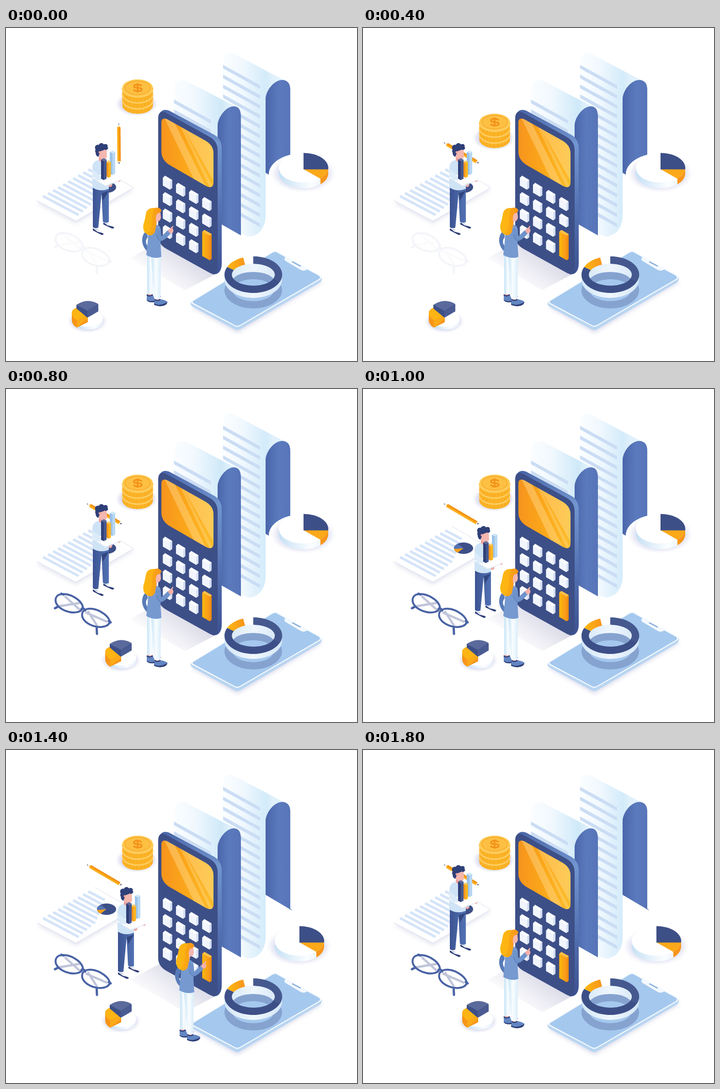
Write an HTML page that moves like this. It is 768 px wide and 729 px high and loops after 2000 ms.

```html
<!DOCTYPE html>
<html lang="en">
<head>
<meta charset="utf-8">
<title>Isometric accounting</title>
<style>
html, body { margin: 0; width: 100%; height: 100%; overflow: hidden; background: #fff; }
svg { display: block; width: 100vw; height: 100vh; }
.step { animation: 2s step-end infinite; }
#pencilUp { animation-name: hide; }
#pencilFlat { animation-name: show; }
#coins { animation-name: coins; }
#glasses { animation-name: glasses; }
#smallPie { animation-name: smallPie; }
#man { animation-name: man; }
#bigPie { animation-name: bigPie; }
#woman { animation-name: woman; }
@keyframes hide { 0% { opacity: 1 } 10%, 100% { opacity: 0 } }
@keyframes show { 0% { opacity: 0 } 10%, 100% { opacity: 1 } }
@keyframes coins { 0% { transform: none } 20%, 100% { transform: translate(0, 75px) } }
@keyframes glasses { 0% { opacity: .06 } 30%, 100% { opacity: 1 } }
@keyframes smallPie { 0% { transform: none } 40%, 100% { transform: translate(73px, -48px) } }
@keyframes man { 0%, 80%, 100% { transform: none } 50% { transform: translate(55px, 48px) } }
@keyframes bigPie { 0% { transform: none } 60%, 100% { transform: translate(-9px, 112px) } }
@keyframes woman { 0%, 90%, 100% { transform: none } 70% { transform: translate(72px, 29px) } }
</style>
</head>
<body>
<svg viewBox="0 0 768 729" preserveAspectRatio="none">
  <defs>
    <linearGradient id="paperBack" gradientUnits="userSpaceOnUse" x1="474" y1="0" x2="585" y2="0">
      <stop stop-color="#fcfeff"/><stop offset=".4" stop-color="#f0f8fe"/><stop offset=".85" stop-color="#d3ebfa"/><stop offset="1" stop-color="#e0f1fb"/>
    </linearGradient>
    <linearGradient id="paperFront" gradientUnits="userSpaceOnUse" x1="364" y1="0" x2="490" y2="0">
      <stop stop-color="#fcfeff"/><stop offset=".4" stop-color="#f0f8fe"/><stop offset=".85" stop-color="#cfe9f8"/><stop offset="1" stop-color="#e0f1fb"/>
    </linearGradient>
    <linearGradient id="under"><stop stop-color="#4a66ab"/><stop offset=".5" stop-color="#5b7abd"/><stop offset="1" stop-color="#5674b7"/></linearGradient>
    <linearGradient id="caseSide" x2="0" y2="1"><stop stop-color="#4a66a8"/><stop offset=".2" stop-color="#7296d0"/><stop offset=".6" stop-color="#5472b2"/><stop offset="1" stop-color="#3c5191"/></linearGradient>
    <linearGradient id="screen"><stop stop-color="#f7941d"/><stop offset=".5" stop-color="#fba81a"/><stop offset="1" stop-color="#fdbd2c"/></linearGradient>
    <linearGradient id="amber"><stop stop-color="#fdb80f"/><stop offset="1" stop-color="#f7951b"/></linearGradient>
    <linearGradient id="ice"><stop stop-color="#c6e1f5"/><stop offset=".65" stop-color="#fbfdff"/><stop offset="1" stop-color="#e6f1fb"/></linearGradient>
    <linearGradient id="wall"><stop stop-color="#d3e6f7"/><stop offset=".5" stop-color="#f0f7fd"/><stop offset="1" stop-color="#d3e6f7"/></linearGradient>
    <linearGradient id="jeans"><stop stop-color="#3c5392"/><stop offset="1" stop-color="#5272b4"/></linearGradient>
    <linearGradient id="pants"><stop stop-color="#c4e3f6"/><stop offset=".5" stop-color="#fafdff"/><stop offset="1" stop-color="#d8edf9"/></linearGradient>
    <linearGradient id="floor" gradientUnits="userSpaceOnUse" x1="385" y1="490" x2="335" y2="560">
      <stop stop-color="#dcdce9"/><stop offset="1" stop-color="#fff"/>
    </linearGradient>
    <radialGradient id="soft"><stop offset=".6" stop-color="#c9cbe8"/><stop offset=".8" stop-color="#d9dbf0" stop-opacity=".6"/><stop offset="1" stop-color="#fff" stop-opacity="0"/></radialGradient>
    <filter id="blur"><feGaussianBlur stdDeviation="5"/></filter>
    <clipPath id="backClip"><path d="M474 60H568V410C568 440 550 457 528 456L474 456Z"/></clipPath>
    <clipPath id="screenClip"><path id="screenShape" d="M340 207C340 198 346 196 355 201L437 247Q454 257 454 275V338C454 348 448 351 438 346L358 300Q340 289 340 270Z"/></clipPath>
    <g id="pencil">
      <path d="M0-44L-1.5-40H1.5Z" fill="#2c3768"/>
      <path d="M-1.5-41H1.5L3.6-35V-33H-3.6V-35Z" fill="#fff1de"/>
      <path d="M-3.6-35L0-37L3.6-35V40H-3.6Z" fill="#fbac17"/>
      <path d="M.8-36L3.6-35V40H.8Z" fill="#f18a10"/>
      <path d="M-3.6 39H3.6L2.6 43H-2.6Z" fill="#fff1dc"/>
      <circle cy="43" r="1.4" fill="#2c3768"/>
    </g>
  </defs>

  <!-- long receipt -->
  <path d="M474 300V78C474 58 485 50 498 56L608 114C582 116 568 140 568 160V410C568 440 550 458 528 456L514 450Z" fill="url(#paperBack)"/>
  <g id="backLines" clip-path="url(#backClip)" fill="#cbddf4"></g>
  <path d="M568 317V155C569 136 588 111 608 114Q622 117 622 135V347L627 352Z" fill="url(#under)"/>
  <path d="M366 260V146C363 122 376 110 393 115L502 172C480 174 463 195 463 215V260Z" fill="url(#paperFront)"/>
  <g id="frontLines" fill="#cbddf4"></g>
  <path d="M463 425V213C464 193 485 168 502 172Q514 174 514 194V454Z" fill="url(#under)"/>

  <!-- sheet -->
  <path d="M68 383L153 428L279 354L195 312Z" fill="#c9cbe0" opacity=".5" filter="url(#blur)"/>
  <path d="M68 377L153 422L279 349L195 301Z" fill="#fff"/>
  <path d="M68 377L153 422L279 349V351L153 425L68 379Z" fill="#e6e8f3"/>
  <path d="M195 301L279 349" stroke="#ececf5" stroke-width="1.5"/>
  <g id="sheetLines" stroke="#d5e4f8" stroke-width="5.5"></g>
  <ellipse cx="220" cy="348.5" rx="21" ry="12.5" fill="#3d4f87"/>
  <path d="M220 348.5L199 350Q201 355 207 358.3Z" fill="#f7a01b"/>
  <path d="M220 348.5L199 350Q198 343 207 339Z" fill="#5674b4"/>

  <!-- calculator -->
  <path d="M271 504L345 463L458 539L392 574Z" fill="url(#floor)"/>
  <path d="M337 186C342 178 351 178 359 182L456 234Q472 243 472 264V516C472 532 464 541 452 539L345 440Z" fill="url(#caseSide)"/>
  <path d="M333 199C333 184 340 180 351 186L445 238Q463 248 463 267V521C463 538 456 542 444 535L352 484Q333 474 333 455Z" fill="#3d4f87"/>
  <use href="#screenShape" fill="url(#screen)"/>
  <g clip-path="url(#screenClip)" fill="#ffe3a0">
    <path d="M383 210H460V345Z" opacity=".38"/>
    <path d="M345 194L369 208L440 352L414 337Z" opacity=".38"/>
    <path d="M378 208L385 212L455 352H447Z" opacity=".3"/>
  </g>
  <g id="keys"></g>
  <path d="M429.5 446L434 442L450 451V505L446 508.5L429.5 499Z" fill="#ee8c10"/>
  <path d="M429.5 446L434 442L450 451L446 455Z" fill="#fdc04a"/>
  <path d="M429.5 446L446 455V508.5L429.5 499Z" fill="url(#amber)"/>

  <!-- phone -->
  <path d="M406 610L506 667L692 556L590 500Z" fill="#b9bcdc" opacity=".55" filter="url(#blur)"/>
  <path d="M404 600V605Q405 608 410 611L501 660Q507 663 513 659L687 557Q692 553 691 546Z" fill="#b9d5f1"/>
  <path d="M408 596L582 490Q588 486 594 489L687 541Q694 546 687 551L513 652Q507 656 501 653L408 604Q401 600 408 596Z" fill="#f3f9fe"/>
  <path d="M410 597.500L583 492Q588 489 592 491L611 501.500C607 508 610 509 615 512L642 528C647 531 652 533 659 528.500L684 542Q690 546 684 550L512 650Q507 653 502 651L410 602Q407 600 410 597.500Z" fill="#a5c8ee"/>
  <path d="M627 512L644 521" stroke="#7da5d8" stroke-width="2.5" stroke-linecap="round"/>
  <path d="M478 574a63 40 0 1 0 126 0a63 40 0 1 0-126 0M496 574a45 24 0 1 1 90 0a45 24 0 1 1-90 0" fill="#86a3d0"/>
  <path d="M478 540V551A63 40 0 0 0 604 551V540A63 24 0 0 0 478 540M495 555a46 21 0 1 1 92 0a46 21 0 1 1-92 0" fill="url(#wall)" fill-rule="evenodd"/>
  <path d="M541 500A63 40 0 1 1 484 523L498.5 530A47 24 0 1 0 541 516Z" fill="#3d4f87"/>
  <path d="M541 500A63 40 0 0 1 599 556L585 549A47 24 0 0 0 541 516Z" fill="#46598f"/>
  <path d="M484 523A63 40 0 0 1 519 502.5L523 518A47 24 0 0 0 498.5 530Z" fill="url(#amber)"/>

  <g id="coins" class="step">
    <ellipse cx="286" cy="166" rx="49" ry="29" fill="url(#soft)" opacity=".9"/>
    <path d="M254.5 131V169A33.5 19 0 0 0 321.5 169V131Z" fill="#fbb426"/>
    <g id="coinEdges" fill="none"></g>
    <ellipse cx="288" cy="131" rx="33.5" ry="18.5" fill="#fdc94f"/>
    <ellipse cx="288" cy="131" rx="28" ry="15" fill="#fdc043" stroke="#f9a52a" stroke-width="1.5"/>
    <path d="M297 127C292 122 280 123 280 128C280 133 297 129 297 134.5C297 139.5 283 139.5 279 135M288 121V141" fill="none" stroke="#f4931a" stroke-width="3.6"/>
  </g>

  <use id="pencilUp" class="step" href="#pencil" transform="translate(247 252.5) rotate(-.5)"/>
  <g id="pencilFlat" class="step"><use href="#pencil" transform="translate(214.5 273) rotate(-59.6)"/></g>

  <g id="glasses" class="step" fill="none" stroke="#4a63a5" stroke-width="4.2" stroke-linecap="round">
    <path d="M114 476L163 468M180 488L198 516M130 455L160 482M176 490L220 509" stroke="#c0c5da" stroke-width="5"/>
    <path d="M120 449.500C139 446 164 461 168 476C168 490 147 492 131 486C115 480 106 469 109 458Q112 450 120 449.500Z"/>
    <path d="M178 481.500C197 478 222 493 227 508C227 521 205 524 189 518C173 512 164 501 167 490Q170 483 178 481.500Z"/>
    <path d="M165 482Q169 477 173 485M121 448L126 450M107 480L114 476.500M199 536L198.500 524M225 508L229 511" stroke-width="5"/>
  </g>

  <g id="smallPie" class="step">
    <ellipse cx="178" cy="642" rx="46" ry="27" fill="url(#soft)" opacity=".8"/>
    <path d="M155 650L211 636V643C211 656 190 665 155 656Z" fill="url(#ice)"/>
    <path d="M178 634L202 622C215 630 215 644 201 650Q182 658 155 650Z" fill="#fff"/>
    <path d="M144 622V642Q146 651 155 656L179 644V628Z" fill="#f7951b"/>
    <path d="M155 640L179 628V636L155 656Z" fill="#fbaa18"/>
    <path d="M155 612Q144 616 144 623Q144 633 155 640L179 628Z" fill="#fdb415"/>
    <path d="M154 606V614L178 634L202 620V605Z" fill="#3d4f87"/>
    <path d="M178 619L202 605V620L178 634Z" fill="#4a5b92"/>
    <path d="M154 606Q178 590 202 604L178 619Z" fill="#5a6a9c"/>
  </g>

  <g id="bigPie" class="step">
    <ellipse cx="650" cy="320" rx="75" ry="46" fill="#fff"/>
    <ellipse cx="650" cy="318" rx="75" ry="44" fill="url(#soft)" opacity=".8"/>
    <path d="M597 307V318A54 33 0 0 0 705 318V307Z" fill="url(#ice)"/>
    <path d="M705 308V320Q703 334 688 342V329Z" fill="#f7951b"/>
    <ellipse cx="651" cy="306" rx="54" ry="32.5" fill="#fff"/>
    <path d="M651 309L705 309Q703 321 688 330Z" fill="#fba81a"/>
    <path d="M651 309.5V273.5A54 33 0 0 1 705 309.5Z" fill="#3d4f87"/>
  </g>

  <g id="man" class="step">
    <path d="M190 439Q200 440 204 445L213 450Q215 453 209 453L190 443ZM213 426Q222 427 227 431L236 436Q238 439 232 439L213 430Z" fill="#2f3f78"/>
    <path d="M190 438L204 444L212 449L200 446ZM213 425L228 431L235 435L222 432Z" fill="#f3f6fd"/>
    <path d="M190 350H225V425Q217 428 212 424L209 362L202 437Q195 440 190 436Z" fill="url(#jeans)"/>
    <path d="M209 362L225 356L212 378Z" fill="#32467f"/>
    <path d="M203 282H216V298H203Z" fill="#eda49d"/>
    <path d="M203 289Q189 291 189 306V349Q205 360 225 352V293L217 289Q210 298 203 289Z" fill="#cfe3f6"/>
    <path d="M203 264H220L221 281Q219 289 211 287L203 283Z" fill="#f4b7b0"/>
    <path d="M196 266C192 260 198 254 203 256C205 251 212 251 214 255C219 252 224 256 222 260C226 264 220 269 216 266C211 269 207 268 206 272L202 282Q196 280 196 272Q194 270 196 266Z" fill="#2f3f78"/>
    <circle cx="205" cy="272" r="2.5" fill="#eda49d"/>
    <path d="M224 343L232 341Q234 346 229 348Q224 349 224 343M242 335L249 331Q253 335 247 337Z" fill="#f0aaa4"/>
    <path d="M187 327L218 345L260 329L232 314Z" fill="#fff"/>
    <path d="M187 327L218 345L260 329L218 348Z" fill="#dfe8f5"/>
    <path d="M189 309Q186 326 198 333L208 334V326L200 318Z" fill="#dcebf9"/>
    <g id="manBars"></g>
  </g>

  <g id="woman" class="step">
    <path d="M310 578H321V588H310ZM327 586H337V598H327Z" fill="#f0aaa4"/>
    <path d="M308 583Q313 588 321 583L325 593V598Q312 601 308 594ZM324 593Q331 599 337 594Q345 594 353 599Q354 604 345 607Q335 611 324 604Z" fill="#6386c2"/>
    <path d="M308 594Q313 600 325 597V600Q312 602 308 596ZM324 603Q335 610 353 600Q353 605 345 608Q334 611 324 606Z" fill="#2f3f78"/>
    <path d="M308 584Q313 589 321 584M325 594Q331 599 338 594M335 584L338 589" fill="none" stroke="#2f3f78" stroke-width="2.5"/>
    <path d="M309 492H325L321 582Q315 585 309 581Z" fill="url(#pants)"/>
    <path d="M317 494H339L338 592Q331 596 325 592Z" fill="url(#pants)"/>
    <path d="M309 443Q297 450 298 468Q300 481 309 489V476Q303 467 310 458Z" fill="#587bb8"/>
    <path d="M312 436Q324 424 336 434Q341 440 338 470L340 501Q325 507 307 497L310 468Z" fill="#7699d0"/>
    <path d="M328 440Q338 434 340 456L355 442L361 449Q348 465 338 467Q329 466 328 440Z" fill="#6e92ca"/>
    <path d="M329 452Q331 464 339 466" stroke="#4f70ae" fill="none"/>
    <path d="M354 443L360 438L365 433Q368 433 364 438Q368 442 365 448L359 450Z" fill="#f3b0aa"/>
    <path d="M325 404H338L339 415Q337 424 331 423L329 433H321Z" fill="#f4b7b0"/>
    <path d="M306 408Q308 393 325 394Q336 391 340 399Q339 405 331 406Q327 412 328 421Q330 431 327 439Q327 451 317 454Q304 453 301 441Q299 432 303 423Z" fill="url(#amber)"/>
    <path d="M306 408Q308 393 325 394Q318 411 319 428Q318 442 309 451Q302 448 301 441Q299 432 303 423Z" fill="#fdb913" opacity=".65"/>
  </g>
</svg>
<script>
const fill = (id, count, draw) => {
  document.getElementById(id).innerHTML = Array.from({ length: count }, (_, i) => draw(i)).join('');
};
const band = (x, y) => `<path d="M${x} ${y}l81 45v8l-81-45Z"/>`;

fill('backLines', 15, i => band(475, 80.5 + i * 21.6));
fill('frontLines', 2, i => band(367.5, 156.5 + i * 21.6));

fill('sheetLines', 10, i => {
  const len = i < 5 ? 78 - i * 2 : 64 - (i - 5) * 7;
  return `<path d="M${81 + i * 11} ${368 - i * 6.5}l${len} ${len * .53}"/>`;
});

// Column-major keypad; the last column holds two keys above the tall one.
fill('keys', 14, i => {
  const col = i >> 2, row = i & 3;
  return `<g transform="translate(${343 + col * 28.7} ${323 + col * 15.6 + row * 36})" stroke-linejoin="round">
    <path d="M1 5L5 1L20 10V27L16 30L1 21Z" fill="#d3def2" stroke="#d3def2" stroke-width="1.5"/>
    <path d="M1 5L15.5 13V30L1 21.5Z" fill="#f1f5fd" stroke="#f1f5fd" stroke-width="1.5"/>
    <path d="M1 5L5 1L20 10L15.5 13Z" fill="#fff"/></g>`;
});

fill('coinEdges', 3, i => {
  const y = 134 + i * 13;
  let ticks = '';
  for (let a = .25; a < 3; a += .26) {
    ticks += `M${288 - 33.5 * Math.cos(a)} ${y + 1 + 19 * Math.sin(a)}v7`;
  }
  return `<path d="${ticks}" stroke="#f8a421" stroke-width="1.2"/>
    <path d="M254.5 ${y - 2}A33.5 19 0 0 0 321.5 ${y - 2}" stroke="#fdcd64" stroke-width="3"/>`;
});

const bars = [
  [227, 268, 54, '#9cc3e9', '#b9d8f3', '#d5e9f9'],
  [219.5, 290, 38, '#f7951b', '#fdb415', '#fdc650'],
  [208, 285, 48, '#2f3f78', '#48598f', '#5c6b9d']
];
fill('manBars', 3, i => {
  const [x, y, h, left, right, top] = bars[i];
  const w = i === 1 ? 5 : 6;
  return `<g transform="translate(${x} ${y})">
    <path d="M0 3L${w} 6V${h}L0 ${h - 3}Z" fill="${left}"/>
    <path d="M${w} 6L${2 * w} 3V${h - 3}L${w} ${h}Z" fill="${right}"/>
    <path d="M0 3L${w} 0L${2 * w} 3L${w} 6Z" fill="${top}"/></g>`;
});
</script>
</body>
</html>
```
